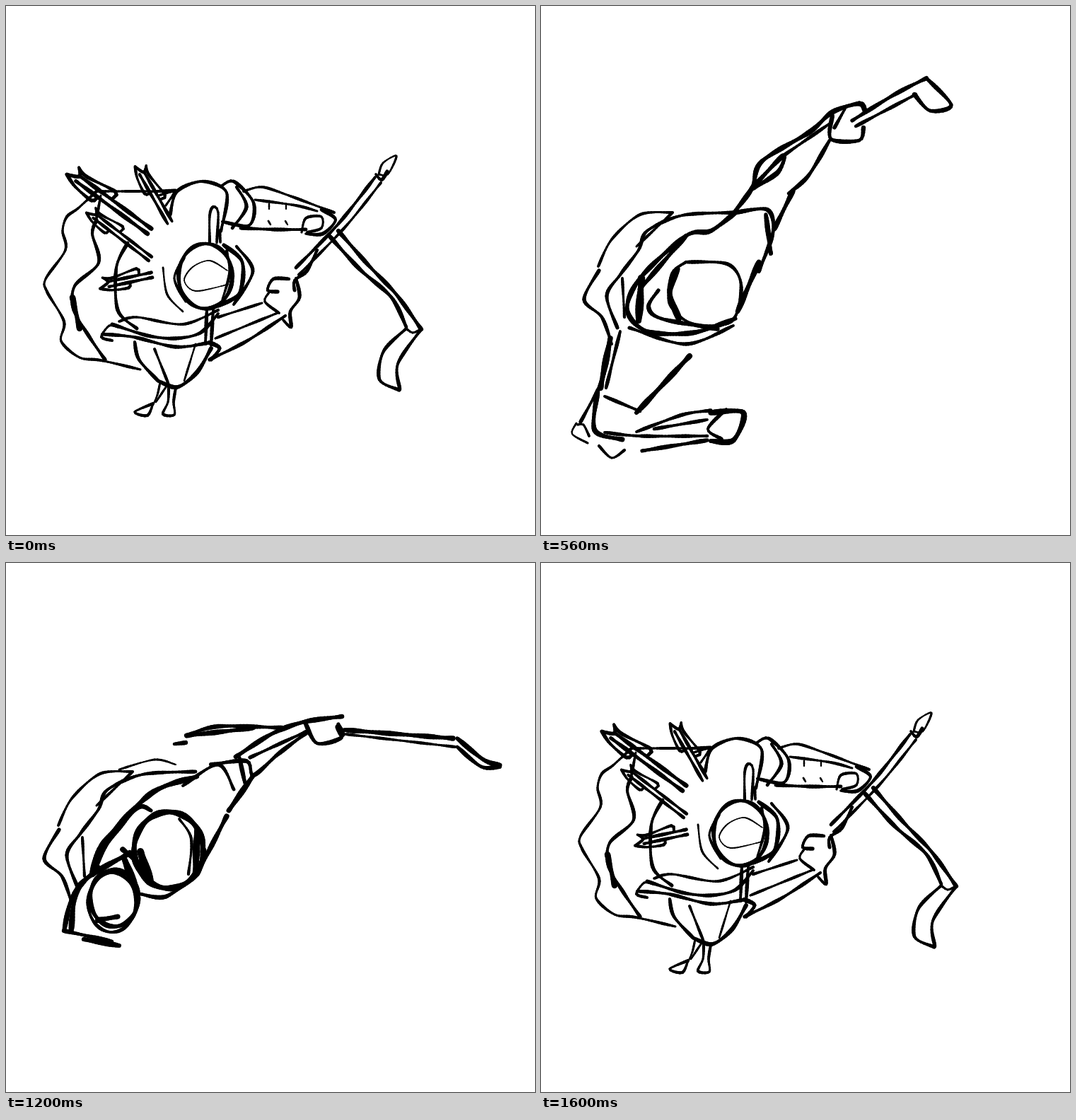
Write an HTML page with a canvas that moves like this. It is 748x748 px and loops after 1920 ms.

```html
<!DOCTYPE html>
<html lang="en">
<head>
<meta charset="utf-8">
<title>Archer</title>
<style>
html, body { margin: 0; width: 100%; height: 100%; overflow: hidden; background: #fff; }
canvas { display: block; width: 748px; height: 748px; }
</style>
</head>
<body>
<canvas id="stage" width="748" height="748"></canvas>
<script>
const ctx = document.getElementById('stage').getContext('2d');
const LOOP = 1920;

// Smooth brush stroke whose width swells a little along the way.
function brush(width, pts) {
  let [x, y] = pts[0], step = x;
  for (let i = 0; i < pts.length - 1; i++) {
    const a = pts[i], b = pts[i + 1];
    const before = pts[i - 1] || a, after = pts[i + 2] || b;
    const n = Math.ceil(Math.hypot(b[0] - a[0], b[1] - a[1]) / 4);
    for (let k = 1; k <= n; k++) {
      const t = k / n, u = t * t * (3 - 2 * t);
      const ta = 0.45 * t * (1 - t) ** 2, tb = 0.45 * t * t * (t - 1);
      const at = d => a[d] + (b[d] - a[d]) * u + (b[d] - before[d]) * ta + (after[d] - a[d]) * tb;
      const nx = at(0), ny = at(1);
      ctx.lineWidth = width * (0.9 + 0.16 * Math.sin(step++ * 0.55));
      ctx.beginPath();
      ctx.moveTo(x, y);
      ctx.lineTo(nx, ny);
      ctx.stroke();
      x = nx;
      y = ny;
    }
  }
}

const ink = (width, text) => brush(width, text.split(' ').map(p => p.split(',').map(Number)));

function oval(width, cx, cy, rx, ry) {
  brush(width, Array.from({ length: 25 }, (_, i) => {
    const a = i * Math.PI / 12;
    return [cx + rx * Math.cos(a), cy + ry * Math.sin(a)];
  }));
}

function place(dx, dy, deg, px, py, ...draw) {
  ctx.save();
  ctx.translate(px + dx, py + dy);
  ctx.rotate(deg * Math.PI / 180);
  ctx.translate(-px, -py);
  draw.forEach(f => f());
  ctx.restore();
}
const shift = (dx, dy, ...draw) => place(dx, dy, 0, 0, 0, ...draw);
const turn = (deg, px, py, ...draw) => place(0, 0, deg, px, py, ...draw);

// Feathered arrow from its tail to the end of the shaft.
function feathered(x1, y1, x2, y2, size) {
  const len = Math.hypot(x2 - x1, y2 - y1) / size;
  ctx.save();
  ctx.translate(x1, y1);
  ctx.rotate(Math.atan2(y2 - y1, x2 - x1));
  ctx.scale(size, size);
  for (const side of [-4, 5]) brush(6, [[6, side], [len, side]]);
  ink(5, '-2,-13 14,-9 60,-16 62,-5');
  ink(5, '-10,5 10,12 40,14 44,5');
  ink(5, '-2,-13 6,-3 -10,5');
  ctx.restore();
}

function aimCape() {
  ink(4, '128,262 102,286 86,298 80,318 84,345 56,386 58,404 82,446 78,474 104,497 134,501 190,514');
  ink(5, '128,303 122,322 131,363 97,396 96,430 118,468 140,500');
  ink(8, '94,412 104,456');
  ink(4, '128,262 180,262 214,262 240,260');
  ink(4, '134,268 128,300');
}

function aimBody() {
  ink(5, '172,335 156,370 158,430 185,456');
  ink(5, '232,295 242,262 278,248 312,264 304,318');
  ink(5, '304,255 322,248 350,278 344,310 306,305');
  ink(5, '326,256 340,284 320,314');
  oval(6, 282, 382, 38, 46);
  ink(6, '308,338 334,362 330,406 300,424');
  ink(5, '326,340 349,375 322,422');
  ink(4, '312,346 316,378 306,415');
  ink(2, '313,394 268,403 252,388 264,369 288,360 313,374');
  ink(4, '252,356 238,385 254,418');
  ink(3, '222,370 228,408 250,432');
  ink(4, '288,335 288,296 293,284 300,292 298,335');
  ink(5, '302,318 303,334');
  ink(5, '284,430 282,478');
  ink(5, '293,428 290,480');
}

function aimSkirt() {
  ink(4, '160,446 185,440 250,450 300,430');
  ink(5, '150,450 200,466 240,470 275,462 300,435');
  ink(5, '136,464 180,468 240,482 288,476');
  ink(4, '150,473 135,468 146,452 160,454');
  ink(5, '182,475 188,500 215,530');
  ink(4, '210,485 230,535');
  ink(3, '268,478 252,530');
  ink(6, '215,530 242,539 270,518 290,484');
  ink(3, '218,532 214,550 208,564');
  ink(3, '228,536 212,560');
  ink(4, '208,562 182,574 200,579 208,562');
  ink(4, '240,540 237,560 238,578 222,577 229,560 230,540');
}

function quiver() {
  feathered(97, 240, 203, 318, 1);
  feathered(190, 232, 232, 306, 0.8);
  feathered(122, 294, 204, 357, 0.75);
  feathered(140, 394, 206, 380, 0.8);
  ink(4, '216,268 238,262 226,282');
}

function aimBow() {
  ink(4, '336,262 362,256 400,268 464,292');
  ink(4, '352,274 410,282 440,290');
  ink(5, '332,314 380,316 424,316');
  for (const x of [372, 396]) {
    brush(3, [[x, 280], [x, 287]]);
    brush(3, [[x - 1, 304], [x + 2, 309]]);
  }
  ink(4, '418,320 424,300 446,298 446,314 426,320');
  ink(5, '446,288 466,302 448,322 424,322');
  ink(6, '458,326 500,372 545,412 566,454');
  ink(6, '470,318 512,366 552,408 587,457');
  ink(5, '566,456 534,488 528,528 556,543');
  ink(5, '587,457 554,506 557,542');
  ink(4, '566,456 575,462 587,457');
}

function aimDraw() {
  ink(5, '522,242 470,308 410,370');
  ink(4, '530,250 480,312 414,380');
  ink(3, '527,238 533,222 552,212 540,238 527,238');
  ink(5, '523,238 531,246 539,234');
  ink(5, '440,345 425,375 408,388 408,402');
  ink(5, '400,386 378,386 370,402 384,404');
  ink(4, '372,405 366,418 386,434');
  ink(5, '410,385 415,412 402,432 403,454 392,444');
  ink(4, '300,440 362,420');
  ink(4, '296,470 384,434');
  ink(5, '288,500 340,474 395,438');
  ink(6, '288,476 302,484 290,500');
}

function swingBody() {
  ink(5, '228,278 178,272 146,272 130,288 108,300 88,340 62,402 82,452 74,478');
  ink(7, '74,478 108,497 140,502');
  ink(5, '222,290 160,300 118,355 88,415 90,446 118,470');
  ink(5, '150,272 115,330');
  ink(6, '300,268 230,300 170,350 136,400 132,455');
  ink(5, '265,271 222,290');
  oval(8, 238, 394, 46, 48);
  ink(6, '262,352 286,395 272,430');
  ink(5, '130,450 200,452 240,442');
  ink(4, '140,405 155,424 190,435');
  ink(6, '122,458 120,530 126,544');
  ink(5, '130,470 155,510 195,555');
  ink(7, '198,452 184,530');
  ink(6, '212,475 185,535');
  ink(5, '124,543 165,545 205,520');
}

function swingArm() {
  ink(8, '128,546 134,580 165,582 205,564');
  ink(6, '190,570 250,520 275,490');
  ink(5, '205,560 248,530');
  ink(5, '144,550 155,578');
  ink(6, '185,522 258,484');
  ink(4, '215,500 258,486');
  ink(7, '258,484 256,464 282,446 296,465 284,488 258,484');
  ink(4, '205,465 240,446');
}

function swingBow() {
  ink(6, '262,282 345,254 430,220 462,203 500,210 502,222 480,224');
  ink(8, '292,370 318,330 355,290 375,278');
  ink(6, '365,288 420,256 468,240 496,236');
  ink(4, '300,345 350,288');
  ink(6, '292,247 350,224 445,217');
  ink(7, '292,248 330,246 400,225');
  ink(6, '472,232 478,222 490,230 476,234');
  ink(6, '485,228 595,239');
  ink(5, '500,236 572,246');
  ink(6, '574,248 582,288 606,298 612,288 604,240');
  ink(7, '597,242 604,290');
}

function leanCape() {
  ink(4, '186,292 140,295 100,330 81,368');
  ink(5, '82,374 61,415 86,440 100,478');
  ink(5, '275,292 200,296 150,318 138,345 112,380 93,410 108,455');
  ink(4, '185,293 135,340');
  ink(4, '115,385 118,440');
}

function leanBody() {
  leanCape();
  ink(7, '275,292 240,318 205,325 140,385 122,430 150,460 215,462 275,442');
  ink(11, '142,385 138,445');
  ink(7, '205,325 140,400');
  ink(6, '166,402 152,425 170,442 250,457');
  ink(5, '272,452 205,478 125,455');
  ink(8, '308,362 278,432');
  ink(5, '205,362 264,365 283,395 270,445 215,450 182,420 186,378 205,362');
  ink(9, '193,372 182,405 195,442');
}

function highBow() {
  ink(7, '268,298 298,258 312,220 380,178 412,150 450,138 458,148');
  ink(7, '298,258 342,212 335,235 300,258');
  ink(5, '345,210 410,165');
  ink(6, '408,190 378,240 350,265');
  ink(7, '356,262 330,315');
  ink(6, '275,292 320,288 328,320 308,375');
  ink(7, '318,295 325,350');
  ink(6, '412,155 410,188 450,190 456,172');
  ink(5, '430,145 415,172');
  ink(6, '440,162 500,125 545,102');
  ink(5, '445,170 530,125');
  ink(6, '528,125 550,148 580,140 545,102');
}

function lowArm() {
  ink(9, '98,470 84,540');
  ink(5, '112,460 92,540');
  ink(5, '82,540 56,588');
  ink(7, '80,545 76,600 115,613');
  ink(8, '210,495 135,575');
  ink(5, '90,552 140,573');
  ink(5, '90,603 140,608 235,608');
  ink(6, '143,629 235,614');
  ink(5, '135,602 200,578 240,572');
  ink(5, '160,598 235,585');
  ink(8, '240,575 286,575 272,614 240,615');
  ink(5, '255,612 236,598 262,570');
  ink(3, '50,590 44,605 66,618');
  ink(4, '52,592 60,592 68,608');
  ink(4, '82,622 100,639 118,628');
}

function followBow() {
  ink(7, '268,302 290,275 332,255');
  ink(6, '322,250 345,228 405,190');
  ink(6, '278,250 300,220 400,184');
  ink(8, '278,252 290,252 305,235 400,196');
  ink(8, '398,180 428,156 462,164');
  ink(7, '405,204 440,206 463,180');
  ink(6, '462,162 580,128');
  ink(5, '462,181 540,152 572,149');
  ink(7, '580,127 632,151 620,164 572,149');
  ink(7, '412,205 350,278 318,345 305,365');
}

function followArm() {
  ink(9, '98,470 82,538');
  ink(5, '112,460 95,538');
  ink(7, '165,475 115,550');
  ink(6, '210,485 160,548 125,558');
  ink(9, '78,550 108,552');
  ink(5, '82,568 165,552');
  ink(7, '82,550 95,600 138,613 215,573');
  ink(8, '170,555 200,528 228,532');
  ink(10, '229,530 230,548');
  ink(6, '205,536 225,565 175,573');
}

function reachBody() {
  ink(3, '160,292 210,278 240,285');
  ink(8, '270,302 205,326 135,400 122,440');
  ink(6, '205,350 185,347 140,402 125,440');
  oval(9, 230, 406, 49, 54);
  ink(10, '270,378 268,438');
  ink(13, '190,408 203,450');
  ink(4, '245,362 262,390 258,440');
  ink(7, '312,358 270,440');
  ink(6, '190,468 225,472 265,445');
}

function reachArm() {
  oval(7, 153, 474, 34, 40);
  oval(5, 150, 480, 34, 42);
  ink(7, '130,430 95,470 82,520');
  ink(8, '175,410 105,455 92,520');
  ink(11, '168,420 185,465');
  ink(6, '82,520 150,535');
  ink(8, '110,532 160,541');
  ink(8, '165,405 200,435');
  ink(8, '130,505 158,500');
}

function reachBow() {
  ink(6, '255,244 300,231 390,233');
  ink(7, '256,244 310,238 350,233');
  ink(7, '325,274 375,242 420,225 475,217');
  ink(5, '345,275 425,238');
  ink(6, '290,285 340,280 350,300 385,270 425,240');
  ink(8, '350,300 315,350');
  ink(5, '250,315 300,285 322,320');
  ink(6, '330,275 338,312');
  ink(6, '424,228 440,255 474,247 470,228');
  ink(9, '470,232 475,242');
  ink(7, '478,236 632,248');
  ink(4, '480,242 635,260');
  ink(7, '638,248 675,278 698,286');
  ink(6, '638,260 672,288 698,288');
  ink(6, '238,256 254,254');
}

function nockBody() {
  shift(-3, -12, leanCape);
  ink(5, '240,295 175,325 130,370 127,425');
  ink(8, '195,302 280,292');
  ink(9, '240,298 268,298');
  ink(7, '76,430 110,450');
  oval(7, 248, 391, 48, 49);
  ink(7, '290,372 296,400 264,436');
  ink(10, '108,488 125,440 150,425');
  ink(8, '120,440 122,500 150,528');
  ink(9, '150,430 188,490');
  ink(9, '140,450 132,510');
  ink(6, '150,430 230,490');
  ink(10, '150,495 185,490 215,510 230,490');
  ink(5, '140,475 165,420');
  ink(7, '165,450 205,480');
  ink(3, '172,405 185,435 225,456');
}

function nockBow() {
  ink(5, '240,285 345,258 440,250 415,280 330,335 298,358');
  ink(5, '294,245 340,252 410,252');
  ink(5, '294,244 330,238 420,250');
  ink(6, '425,245 475,248 484,264');
  ink(6, '443,280 480,280');
  ink(5, '455,270 472,266');
  ink(5, '485,268 622,320');
  ink(8, '560,300 620,318');
  ink(5, '480,280 622,332');
  ink(6, '622,320 652,350 686,384 672,392 640,368 622,335');
}

function nockDraw() {
  ink(5, '515,236 415,350');
  ink(9, '522,228 511,238');
  ink(6, '380,365 412,352 410,390 380,365');
  ink(8, '413,362 400,390');
  ink(6, '378,368 325,425');
  ink(6, '382,385 368,462 350,472');
  ink(5, '215,468 285,442 335,438');
  ink(8, '322,425 325,475 270,518');
  ink(5, '335,440 345,465 275,516');
  ink(6, '322,430 305,490');
  ink(7, '180,515 220,526 290,512');
  ink(5, '200,510 270,508');
}

function swing(dx, dy, bowTurn, armTurn) {
  shift(dx, dy, swingBody);
  turn(bowTurn, 290, 340, swingBow);
  place(dx * 3, dy * 2, armTurn, 200, 500, swingArm);
}

function follow(bowTurn, armX, armY) {
  leanBody();
  turn(bowTurn, 300, 340, followBow);
  shift(armX, armY, followArm);
}

function reach(capeX, bowTurn, armY) {
  shift(capeX, 3, leanCape);
  reachBody();
  turn(bowTurn, 300, 340, reachBow);
  shift(0, armY, reachArm);
}

function aim(bowTurn, drawTurn) {
  aimCape();
  aimBody();
  aimSkirt();
  quiver();
  turn(bowTurn, 330, 290, aimBow);
  turn(drawTurn, 290, 480, aimDraw);
}

function nock(bowTurn, drawTurn) {
  nockBody();
  turn(bowTurn, 300, 340, nockBow);
  turn(drawTurn, 280, 470, nockDraw);
}

const poses = [
  [0, () => aim(0, 0)],
  [80, () => swing(16, -8, 23, -28)],
  [160, () => swing(8, -4, 11, -14)],
  [240, () => swing(0, 0, 0, 0)],
  [320, () => { leanBody(); turn(13, 300, 340, highBow); lowArm(); }],
  [560, () => { leanBody(); highBow(); lowArm(); }],
  [640, () => { leanBody(); turn(-1.5, 300, 340, followBow); lowArm(); }],
  [880, () => follow(0, 0, 0)],
  [960, () => follow(5, -2, -8)],
  [1040, () => follow(11, -6, -22)],
  [1120, () => reach(-4, -6, 10)],
  [1200, () => reach(-7, 0, 0)],
  [1280, () => { nockBody(); turn(8, 300, 340, reachBow); }],
  [1360, () => nock(0, 0)],
  [1440, () => nock(6, -4)],
  [1520, () => aim(-5, -5)],
  [1600, () => aim(0, 0)]
];

ctx.lineCap = 'round';
const start = performance.now();
let shown = null;
function tick() {
  const t = (performance.now() - start) % LOOP;
  const pose = poses.findLast(p => p[0] <= t)[1];
  if (pose !== shown) {
    ctx.fillStyle = '#fff';
    ctx.fillRect(0, 0, 748, 748);
    pose();
    shown = pose;
  }
  requestAnimationFrame(tick);
}
tick();
</script>
</body>
</html>
```
